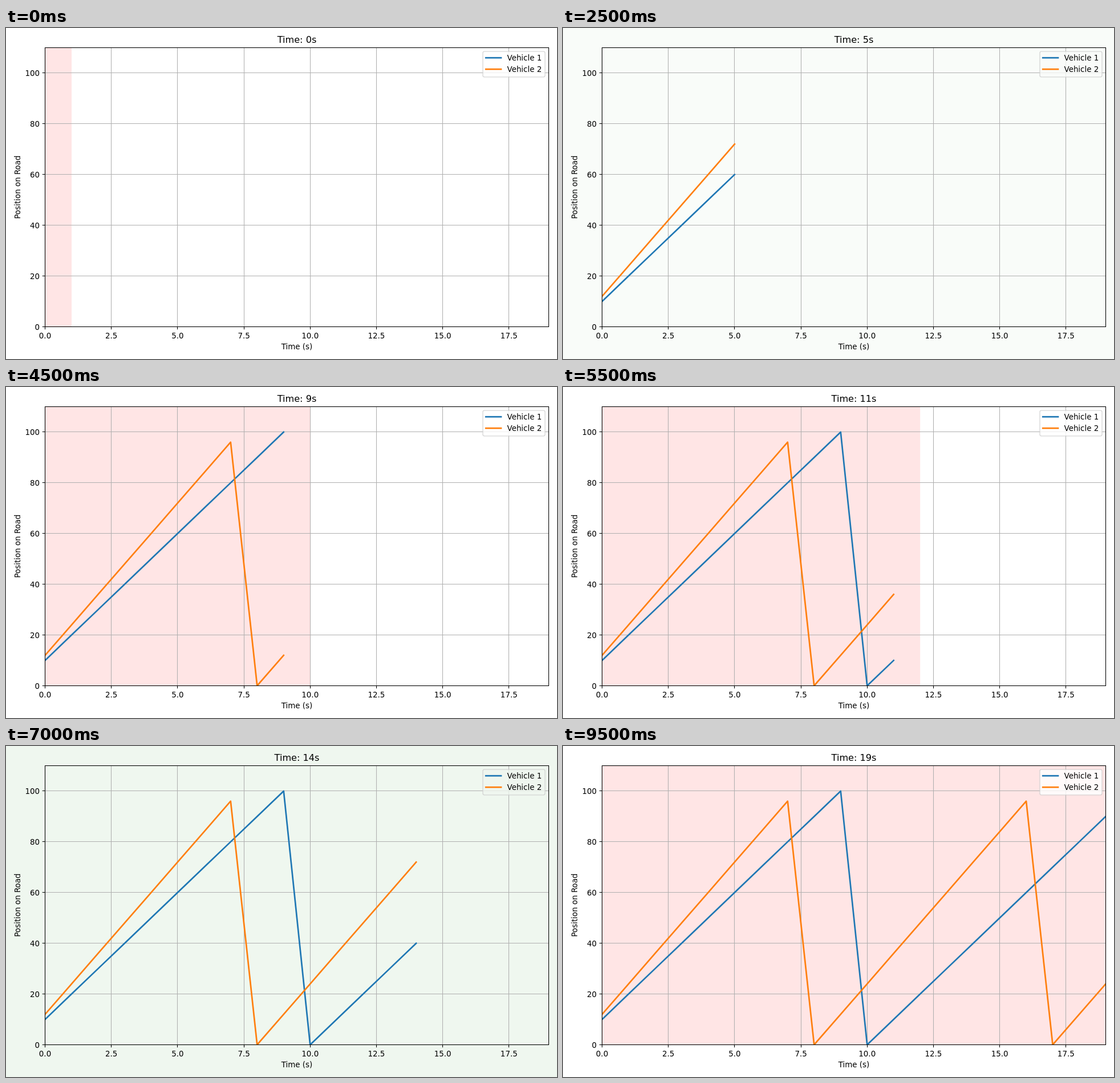
Recreate the animation shown at these times as an HTML page with a canvas. Size 966x580 px, loop 10000 ms.

```html
<!DOCTYPE html>
<html lang="en">
<head>
<meta charset="utf-8">
<title>Vehicle positions</title>
<style>
  html, body { margin: 0; width: 100%; height: 100%; overflow: hidden; background: #fff; }
  canvas { display: block; }
</style>
</head>
<body>
<canvas id="chart" width="966" height="580"></canvas>
<script>
const ctx = document.getElementById('chart').getContext('2d');
const LEFT = 68.5, RIGHT = 951.5, TOP = 34.5, BOTTOM = 523.5;
const STEPS = 20, STEP_MS = 500, ROAD = 100;
const X_TICKS = [0, 2.5, 5, 7.5, 10, 12.5, 15, 17.5];
const Y_TICKS = [0, 20, 40, 60, 80, 100];
const px = t => LEFT + (RIGHT - LEFT) * t / 19;
const py = v => BOTTOM + (TOP - BOTTOM) * v / 110;
const snap = v => Math.floor(v) + 0.5;

// Each vehicle starts over at zero once it passes the end of the road.
function drive(speed) {
  let pos = 0;
  return Array.from({ length: STEPS }, () => {
    pos += speed;
    if (pos > ROAD) pos = 0;
    return pos;
  });
}

const vehicles = [
  { name: 'Vehicle 1', color: '#1f77b4', path: drive(10) },
  { name: 'Vehicle 2', color: '#ff7f0e', path: drive(12) }
];

function line(points, color, width) {
  ctx.beginPath();
  points.forEach(([x, y], i) => i ? ctx.lineTo(x, y) : ctx.moveTo(x, y));
  ctx.strokeStyle = color;
  ctx.lineWidth = width;
  ctx.stroke();
}

function text(str, x, y, align = 'center', size = 13.42) {
  ctx.font = `${size}px "DejaVu Sans", sans-serif`;
  ctx.textAlign = align;
  ctx.fillStyle = '#000';
  ctx.fillText(str, x, y);
}

// The green phase tints the whole page, a little more as time goes on.
function pageColor(t) {
  const k = 0.77 * (t + 1) / 19;
  return `rgb(${[26, 13, 26].map(d => Math.round(255 - d * k))})`;
}

function drawGrid() {
  ctx.lineCap = 'butt';
  for (const t of X_TICKS) {
    const x = snap(px(t));
    line([[x, TOP], [x, BOTTOM]], '#b0b0b0', 1.07);
  }
  for (const v of Y_TICKS) {
    const y = snap(py(v));
    line([[LEFT, y], [RIGHT, y]], '#b0b0b0', 1.07);
  }
}

function drawPaths(t) {
  ctx.save();
  ctx.beginPath();
  ctx.rect(LEFT, TOP, RIGHT - LEFT, BOTTOM - TOP);
  ctx.clip();
  ctx.lineCap = 'square';
  ctx.lineJoin = 'round';
  for (const { path, color } of vehicles) {
    line(path.slice(0, t + 1).map((v, i) => [px(i), py(v)]), color, 2.68);
  }
  ctx.restore();
}

function drawAxes(t) {
  ctx.lineCap = 'butt';
  ctx.strokeStyle = '#000';
  ctx.lineWidth = 1.07;
  ctx.strokeRect(LEFT, TOP, RIGHT - LEFT, BOTTOM - TOP);
  for (const v of X_TICKS) {
    const x = snap(px(v));
    line([[x, BOTTOM], [x, BOTTOM + 4.7]], '#000', 1.07);
    text(v.toFixed(1), px(v), 543.6);
  }
  for (const v of Y_TICKS) {
    const y = snap(py(v));
    line([[LEFT - 4.7, y], [LEFT, y]], '#000', 1.07);
    text(v, 59.1, py(v) + 5, 'right');
  }
  text('Time (s)', 510, 563);
  text(`Time: ${t}s`, 510, 26.2, 'center', 16.1);
  ctx.save();
  ctx.translate(25, 279);
  ctx.rotate(-Math.PI / 2);
  text('Position on Road', 0, 0);
  ctx.restore();
}

function drawLegend(page) {
  ctx.beginPath();
  ctx.roundRect(836, 41.2, 109, 44.6, 2.7);
  ctx.globalAlpha = 0.8;
  ctx.fillStyle = page;
  ctx.fill();
  ctx.strokeStyle = '#ccc';
  ctx.lineWidth = 1.34;
  ctx.stroke();
  ctx.globalAlpha = 1;
  ctx.lineCap = 'square';
  vehicles.forEach(({ name, color }, i) => {
    const y = 52.2 + 20 * i;
    line([[841.2, y], [868, y]], color, 2.68);
    text(name, 878.5, y + 4.8, 'left');
  });
}

function draw(t) {
  const green = (t + 1) % 10 >= 5 && t % 10 !== 9;
  const page = green ? pageColor(t) : '#fff';
  ctx.fillStyle = page;
  ctx.fillRect(0, 0, 966, 580);
  if (!green) {
    ctx.fillStyle = '#ffe5e5';
    ctx.fillRect(LEFT, TOP, Math.min(px(t + 1), RIGHT) - LEFT, BOTTOM - TOP);
  }
  drawGrid();
  drawPaths(t);
  drawAxes(t);
  drawLegend(page);
}

const start = performance.now();
function tick() {
  draw(Math.floor((performance.now() - start) / STEP_MS) % STEPS);
  requestAnimationFrame(tick);
}
tick();
</script>
</body>
</html>
```
